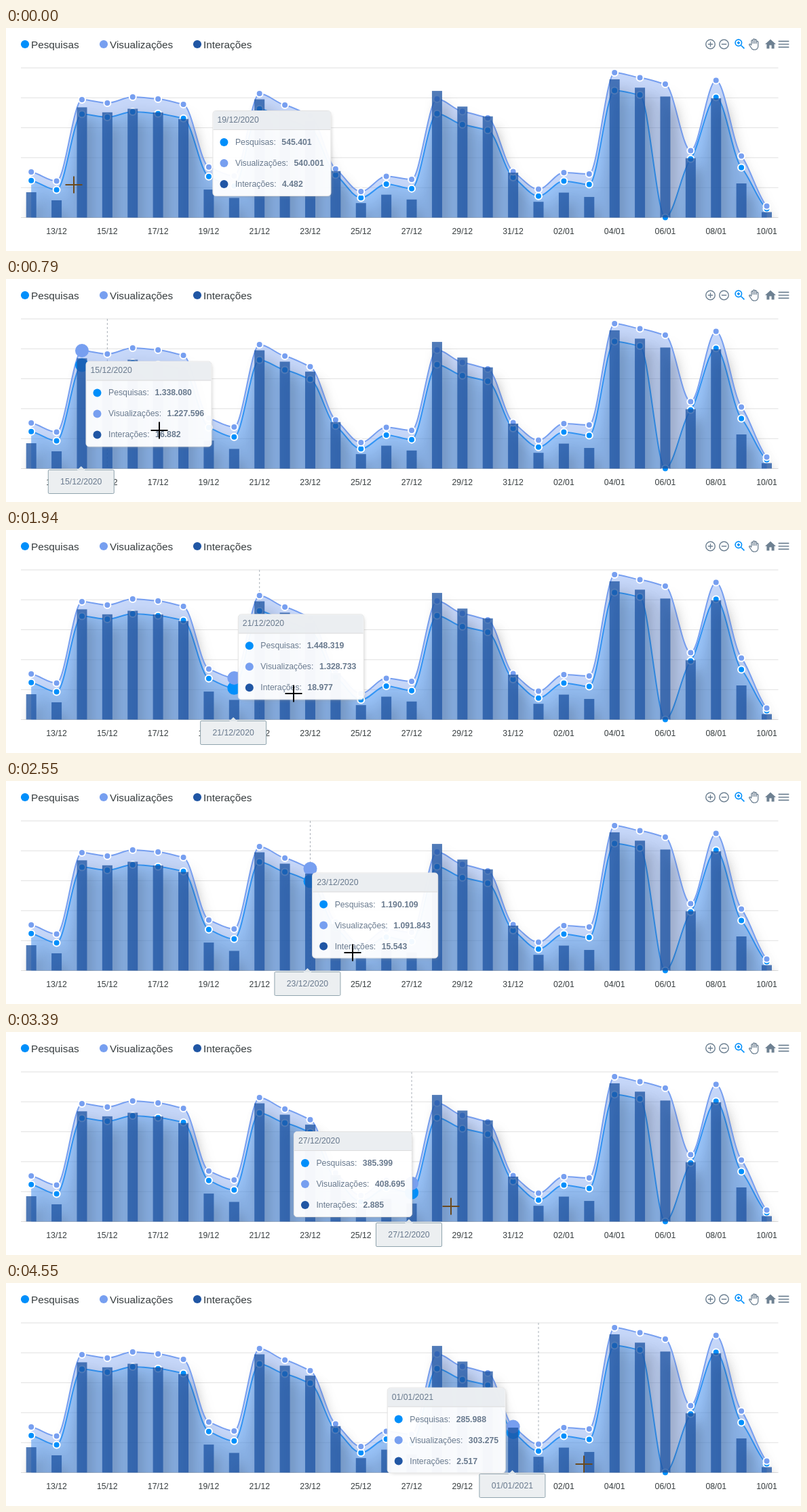
Recreate the animation shown at these times as an HTML page. Size 1172 by 330 pixels, loop 4600 ms.

```html
<!DOCTYPE html>
<html lang="pt-BR">
<head>
<meta charset="utf-8">
<title>Pesquisas, visualizações e interações</title>
<style>
  html, body { margin: 0; width: 100%; height: 100%; overflow: hidden; background: #fff; }
  body { position: relative; font: 12.25px "Liberation Sans", Arial, sans-serif; color: #697a8e; }
  svg { position: absolute; left: 0; top: 0; }
  .tip, .axis-tip { position: absolute; left: 0; top: 0; box-sizing: border-box; white-space: nowrap; }
  .tip { height: 127px; border: 1px solid #e3e3e3; border-radius: 5px; overflow: hidden;
         background: rgba(255,255,255,.95); box-shadow: 2px 2px 6px -4px #999; }
  .tip header { box-sizing: border-box; height: 28px; line-height: 27px; padding: 0 6px; margin-bottom: 2.5px;
                background: rgba(233,237,240,.9); border-bottom: 1px solid #ddd; }
  .row { display: flex; align-items: center; height: 31px; padding: 0 10px; }
  .row i { width: 12px; height: 12px; border-radius: 50%; margin-right: 10.5px; }
  .row b { margin-left: 8.5px; }
  .axis-tip { top: 282px; width: 98px; height: 36px; line-height: 34px; text-align: center;
              background: #eceff1; border: 1px solid #90a4ae; border-radius: 2px; }
  .axis-tip::before { content: ""; position: absolute; left: 42px; top: -6px;
                      border: 6px solid transparent; border-top: 0; border-bottom-color: #dfe5e9; }
</style>
</head>
<body>
<svg id="chart" width="1172" height="330" viewBox="0 0 1172 330">
  <defs>
    <filter id="shadow" filterUnits="userSpaceOnUse" x="0" y="0" width="1172" height="330"
            color-interpolation-filters="sRGB">
      <feDropShadow dx="7" dy="18" stdDeviation="9" flood-color="#000" flood-opacity=".25"/>
    </filter>
    <clipPath id="plot"><rect x="22" y="50" width="1117" height="231"/></clipPath>
  </defs>
</svg>
<div class="tip" id="tip"></div>
<div class="axis-tip" id="axisTip"></div>
<svg width="1172" height="330"><path id="cursor" d="M-12.5 0h25M0-12.5v25" stroke-width="2"/></svg>
<script>
const LOOP = 4600, BASE = 280.4, STEP = 37.39, GRAY = '#6e8192', STALE_DAY = 7;
const HOLIDAYS = [13, 20], DAY_WITHOUT_SEARCHES = 25;

const viewCounts = [488313, 390505, 1263528, 1227596, 1292508, 1270773, 1212874, 540001, 444843, 1328733,
  1205568, 1091843, 520915, 278208, 441220, 408695, 1270114, 1136311, 1067913, 491935,
  303275, 481068, 466578, 1553328, 1498990, 1430163, 716530, 1470010, 658570, 122440];

// Searches and interactions follow the views at a rate set by the kind of day; day 0 is a Saturday
function searchRate(day) {
  if (day === DAY_WITHOUT_SEARCHES) return 0;
  if (day % 7 === 1 || HOLIDAYS.includes(day)) return .943;
  return day % 7 ? 1.09 : 1.01;
}
function actionRate(day) {
  const weekday = day % 7;
  if (weekday === 1) return .00706;
  if (!weekday || HOLIDAYS.includes(day)) return .0083;
  const yearEnd = .002 * Math.exp(-(((day - 16) / 5) ** 2));
  return .0135 + yearEnd + .00025 * (4 - weekday);
}
const scaled = rate => viewCounts.map((count, day) => Math.round(count * rate(day)));
const searches = { name: 'Pesquisas', color: '#008ffb', unit: 9010, values: scaled(searchRate) };
const views = { name: 'Visualizações', color: '#779ff0', unit: 7245, values: viewCounts };
const actions = { name: 'Interações', color: '#2056a4', unit: 108.5, values: scaled(actionRate) };
const allSeries = [searches, views, actions];

// day, time at which it becomes the hovered one
const hoverPoints = [[0, 100], [3, 785], [6, 1190], [11, 2420], [15, 3260], [17, 3680], [20, 4545]];
// time, pointer x, pointer y, tooltip top
const pointerPoints = [[0, 100, 232, 122], [790, 226, 224, 121.5], [1350, 339, 230, 113.5],
  [2550, 511, 254, 135.5], [3390, 656, 258, 147], [4550, 852, 268, 154.5]];

const chart = document.getElementById('chart');
const tip = document.getElementById('tip');
const axisTip = document.getElementById('axisTip');
const cursor = document.getElementById('cursor');

const mix = (a, b, p) => a + (b - a) * p;
const clamp = p => Math.min(1, Math.max(0, p));
function sample(points, at) {
  const next = points.findIndex(point => point[0] > at);
  const k = next < 0 ? points.length - 1 : next;
  const from = points[k - 1], to = points[k], p = (at - from[0]) / (to[0] - from[0]);
  return from.map((v, column) => mix(v, to[column], p));
}

function add(tag, attrs, parent = chart) {
  const node = document.createElementNS('http://www.w3.org/2000/svg', tag);
  set(node, attrs);
  parent.append(node);
  return node;
}
function set(node, attrs) {
  for (const key in attrs) node.setAttribute(key, attrs[key]);
}
function label(text, attrs) {
  add('text', attrs).textContent = text;
}
const xOf = day => 37.2 + day * STEP;
const yOf = (series, day) => BASE - series.values[day] / series.unit;
const dateOf = day => new Date(2020, 11, 12 + day).toLocaleDateString('pt-BR',
  { day: '2-digit', month: '2-digit', year: 'numeric' });
const grouped = n => String(n).replace(/\B(?=(\d{3})+$)/g, '.');

// Monotone cubic: flat at peaks and valleys, sloped in between
function curve(series) {
  const ys = series.values.map((_, day) => yOf(series, day));
  const rises = ys.slice(1).map((y, k) => y - ys[k]);
  const slopes = ys.map((_, k) => {
    const a = rises[k - 1] ?? rises[k], b = rises[k] ?? a;
    return a * b <= 0 ? 0 : Math.sign(a) * Math.min(Math.abs(a), Math.abs(b), Math.abs(a + b) / 4);
  });
  return ys.map((y, k) => {
    const x = xOf(k), third = STEP / 3;
    return k ? `C${x - STEP + third} ${ys[k - 1] + slopes[k - 1] / 3} ${x - third} ${y - slopes[k] / 3} ${x} ${y}`
      : `M${x} ${y}`;
  }).join('');
}

function drawLegend() {
  [28, 144, 282].forEach((x, k) => {
    add('circle', { cx: x, cy: 24, r: 6.1, fill: allSeries[k].color });
    label(allSeries[k].name, { x: x + 9, y: 30, 'font-size': 15.3, fill: '#373d3f' });
  });
}

function drawToolbar() {
  const icon = (x, d, scale, color = GRAY, width = 1.9) => add('path', { d, fill: 'none', stroke: color,
    'stroke-width': width, transform: `translate(${x} 24) scale(${scale}) translate(-12 -12)` });
  const ring = 'M3 12a9 9 0 1018 0a9 9 0 10-18 0M7 12h10';
  icon(1038.5, ring + 'M12 7v10', .75);
  icon(1058.5, ring, .75);
  icon(1082, 'M4 9.5a5.5 5.5 0 1011 0a5.5 5.5 0 10-11 0M14 14l5.5 5.5M7 9.5h5M9.5 7v5', .86, '#008ffb');
  icon(1103, 'M7 13V6a1.5 1.5 0 013 0v5V4a1.5 1.5 0 013 0v7V5a1.5 1.5 0 013 0v6V8a1.5 1.5 0 013 0v8' +
    'a6 6 0 01-6 6h-1c-3 0-4-1-5-3l-4-6c0-2 2-2 4 1', .82, GRAY, 1.6);
  set(icon(1127, 'M10 20v-6h4v6h5v-8h3L12 3 2 12h3v8z', .8), { fill: GRAY, stroke: 'none' });
  icon(1146.5, 'M3 7h18M3 12h18M3 17h18', .87);
}

function drawGrid() {
  for (let k = 0; k < 6; k++)
    add('path', { d: `M22 ${59 + k * 44.3}H1138.5`, stroke: '#e0e0e0' });
  for (let day = 1; day < 30; day += 2)
    label(dateOf(day).slice(0, 5), { x: xOf(day), y: 304.5, 'text-anchor': 'middle',
      'font-size': 12.25, fill: '#373d3f' });
}

function drawArea(series, opacity, plot) {
  const d = curve(series);
  add('path', { d: `${d}V${BASE}H${xOf(0)}Z`, fill: series.color, 'fill-opacity': opacity,
    filter: 'url(#shadow)' }, plot);
  add('path', { d, fill: 'none', stroke: series.color, 'stroke-width': 2 }, plot);
}

function drawMarkers(series) {
  return series.values.map((_, day) => add('circle', { cx: xOf(day), cy: yOf(series, day),
    fill: series.color, stroke: '#fff' }));
}

drawLegend();
drawToolbar();
drawGrid();
const crosshair = add('path', { stroke: '#a9b0b8', 'stroke-dasharray': 3 });
const plot = add('g', { 'clip-path': 'url(#plot)' });
drawArea(searches, .3, plot);
drawArea(views, .42, plot);
const markers = [drawMarkers(searches), drawMarkers(views)];
const barLayer = add('g', { filter: 'url(#shadow)' }, add('g', { 'clip-path': 'url(#plot)' }));
const bars = actions.values.map((_, day) => add('rect', { x: xOf(day) - 7.5, y: yOf(actions, day), width: 15,
  height: BASE - yOf(actions, day), 'fill-opacity': .78 }, barLayer));

function fillTip(day) {
  tip.innerHTML = `<header>${dateOf(day)}</header>` + allSeries.map(s =>
    `<div class="row"><i style="background:${s.color}"></i>${s.name}:<b>${grouped(s.values[day])}</b></div>`).join('');
}
const tipLefts = bars.map((_, day) => {
  fillTip(day);
  const x = xOf(day);
  return x > 580 ? x - 10.5 - tip.getBoundingClientRect().width : x + 5.5;
});
const hoverStarts = Array.from({ length: 21 }, (_, day) => sample(hoverPoints, day)[1]);

let shownDay = -1;
function render(t) {
  const hovered = hoverStarts.filter(start => start <= t).length - 1;
  const active = hovered >= 0;
  const phase = active ? t - hoverStarts[hovered] : 0;
  const eased = 1 - (1 - clamp((phase - 30) / 150)) ** 2.3;
  const day = active ? hovered : STALE_DAY;
  const previous = hovered > 0 ? hovered - 1 : STALE_DAY;
  const [, pointerX, pointerY, tipTop] = sample(pointerPoints, t);

  if (day !== shownDay) {
    fillTip(day);
    axisTip.textContent = dateOf(day);
    shownDay = day;
  }
  tip.style.transform = `translate(${mix(tipLefts[previous], tipLefts[day], eased)}px, ${tipTop}px)`;
  const axisX = mix(xOf(Math.max(0, hovered - 1)), xOf(day), eased);
  axisTip.style.transform = `translateX(${axisX - 50.2}px)`;
  axisTip.style.opacity = !active ? 0 : hovered ? 1 : eased;

  set(crosshair, { d: active ? `M${xOf(day)} 59V${BASE}` : 'M0 0' });
  const enlarged = phase > 40 ? hovered : hovered - 1;
  markers.forEach(list => list.forEach((marker, k) => {
    const big = k === enlarged;
    set(marker, { r: big ? 10 : 5, 'stroke-width': big ? 0 : 2 });
  }));
  const lit = phase > 170 ? hovered : -1;
  bars.forEach((bar, k) => set(bar, { fill: k === lit ? '#4f83d8' : actions.color }));

  set(cursor, { transform: `translate(${Math.round(pointerX)} ${Math.round(pointerY)})`,
    stroke: t < 300 || t > 2900 ? '#6b4a1e' : '#000' });
}

function frame() {
  render(performance.now() % LOOP);
  requestAnimationFrame(frame);
}
frame();
</script>
</body>
</html>
```
